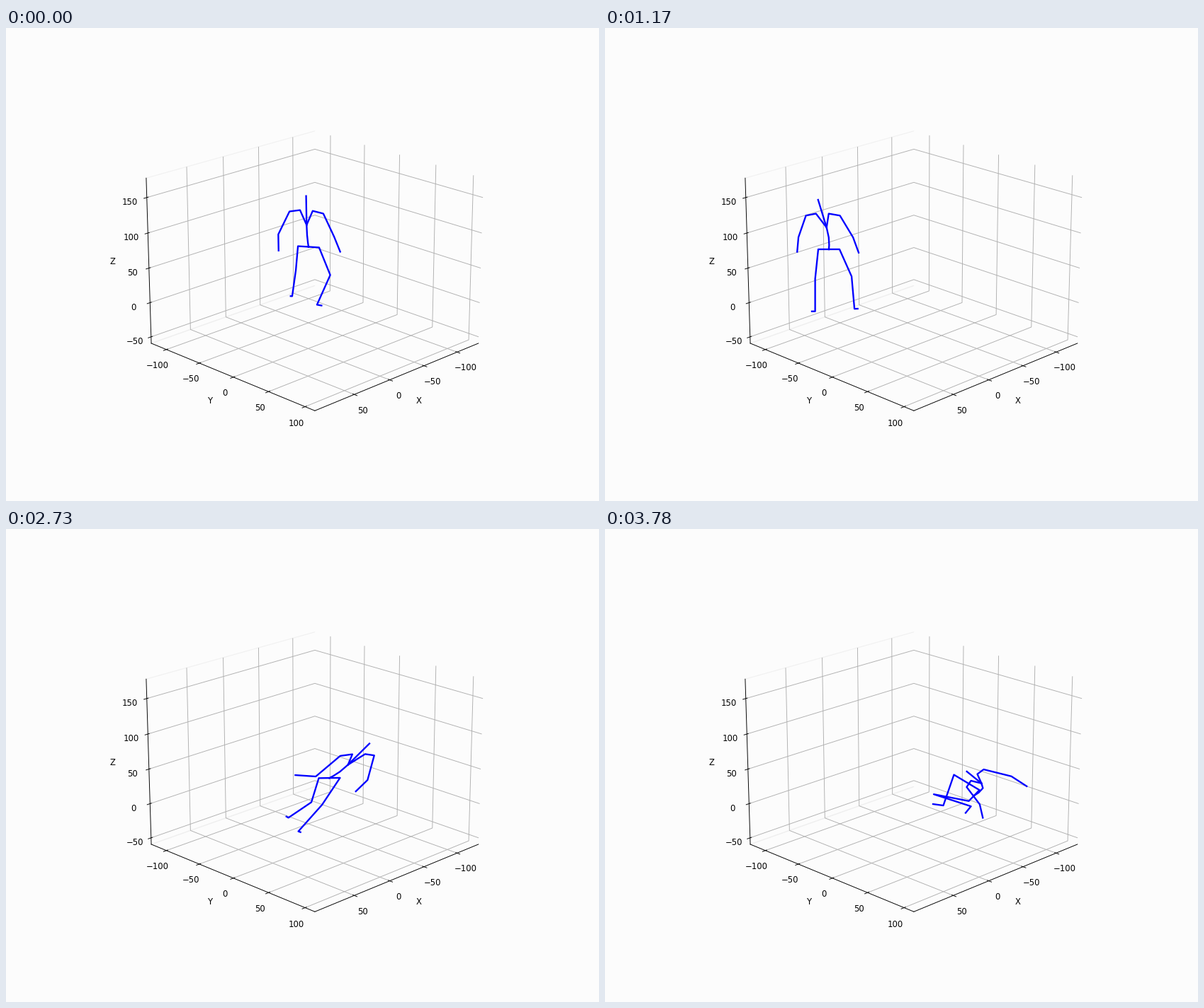
Recreate the animation shown at these times as a matplotlib script. Size 837 px wide and 669 px high, loop 3810 ms.

```python
import numpy as np
import matplotlib.pyplot as plt
from matplotlib.animation import FuncAnimation

W, H, DPI = 837, 669, 83.7
STEP, FRAMES = 30, 127
PAPER = "#fcfcfc"

# Bone lengths in pixels: torso and neck, upper arm and forearm, thigh and shin
SPINE, ARM, LEG = (31, 41), (36, 23), (42, 46)

times, poses = [], []


def pose(t, root, yaw, **limbs):
    """Add a key pose. A limb is two angles in degrees (0 points down,
    90 right) and, where it is foreshortened, a scale for its length."""
    names = ("spine", "arm_l", "arm_r", "leg_l", "leg_r")
    times.append(t)
    poses.append([*root, yaw, *(v for n in names for v in (*limbs[n], 1)[:3])])


# Walking away
pose(0, (427, 309.5), 6, spine=(185, 181),
     arm_l=(-26, 1), arm_r=(25, 22), leg_l=(-5, -8, 0.81), leg_r=(22, -24))
pose(690, (342, 310), 0, spine=(178, 174),
     arm_l=(-15, 91, 0.8), arm_r=(45, 49, 0.56),
     leg_l=(-13, -12, 0.89), leg_r=(30, 1, 0.85))
pose(1170, (316, 313), 0, spine=(186, 197),
     arm_l=(-19, -5, 0.9), arm_r=(31, 20), leg_l=(-6, 0), leg_r=(24, 5))
# Turning back and crouching
pose(1740, (333, 321.5), 40, spine=(185, 166),
     arm_l=(-31, 27), arm_r=(28, 59), leg_l=(45, -15), leg_r=(30, -51, 1.1))
pose(2280, (430.5, 348), 58, spine=(150, 108),
     arm_l=(-91, -73, 1.28), arm_r=(-48, -30, 1.12),
     leg_l=(75, -69, 0.75), leg_r=(72, -46, 1.09))
# Sitting down and leaning back
pose(3180, (469, 354.5), -65, spine=(117, 187),
     arm_l=(13, -70, 1.1), arm_r=(45, -21, 0.9),
     leg_l=(-115, -10, 1.05), leg_r=(-146, -35, 1.08))
pose(3780, (521, 377), -60, spine=(149, 231, 0.65),
     arm_l=(37, 13, 0.85), arm_r=(76, 57, 1.12),
     leg_l=(-101, 72, 1.2), leg_r=(-121, -19))

T, P = np.array(times, float), np.array(poses, float)
SPEED = np.gradient(P, T, axis=0)


def state_at(t):
    """Cubic Hermite blend between the two nearest key poses."""
    i = min(np.searchsorted(T, t, side="right") - 1, len(T) - 2)
    h = T[i + 1] - T[i]
    s = (t - T[i]) / h
    ease = s * s * (3 - 2 * s)
    return (P[i] * (1 - ease) + P[i + 1] * ease
            + h * s * (1 - s) * ((1 - s) * SPEED[i] - s * SPEED[i + 1]))


def aim(deg):
    return np.array([np.sin(np.radians(deg)), np.cos(np.radians(deg))])


def bones(start, lengths, first, second, reach):
    middle = start + reach * lengths[0] * aim(first)
    return middle, middle + reach * lengths[1] * aim(second)


def skeleton(state):
    root, yaw, (spine, *limbs) = state[:2], state[2], state[3:].reshape(5, 3)
    turn = aim(yaw)
    across = np.array([15, 9]) * turn[::-1]

    # The back is a curve that runs smoothly into the neck
    chest, head = bones(root, SPINE, *spine)
    neck = head - chest
    bend = chest - 0.4 * neck
    back = [(1 - s) ** 2 * root + 2 * s * (1 - s) * bend + s * s * chest
            for s in (0, 0.2, 0.55, 1)]
    lines = [[*back, chest + 0.65 * neck, head]]

    for side, arm, leg in zip((-1, 1), limbs[:2], limbs[2:]):
        collar = chest + 0.5 * neck + 0.6 * side * across
        shoulder = chest + 0.43 * neck + 1.6 * side * across
        lines.append([chest, collar, shoulder, *bones(shoulder, ARM, *arm)])

        hip = root + side * across
        knee, ankle = bones(hip, LEG, *leg)
        # Feet stand square to the shin, flattened towards the floor
        size = LEG[1] * (0.5 * turn[0] + 0.1 * side)
        toe = ankle + size * aim(leg[1] + 90) * (1, 0.4)
        lines.append([root, hip, knee, ankle, toe])
    return lines


# The small surplus guards the pixel size against rounding down
fig = plt.figure(figsize=((W + 0.01) / DPI, (H + 0.01) / DPI), dpi=DPI,
                 facecolor=PAPER)

room = fig.add_subplot(projection="3d", facecolor=PAPER)
room.view_init(elev=20, azim=45)
room.set_xticks(range(-100, 51, 50))
room.set_yticks(range(-100, 101, 50))
room.set_zticks(range(-50, 151, 50))
room.set(xlim=(-133.1, 103.5), ylim=(-123.5, 113.1), zlim=(-59.5, 177.1),
         xlabel="X", ylabel="Y", zlabel="Z")
for axis in (room.xaxis, room.yaxis, room.zaxis):
    axis.pane.fill = False
room.xaxis.pane.set_edgecolor("none")

# Overlay in pixel coordinates for the figure
stage = fig.add_axes([0, 0, 1, 1])
stage.set(xlim=(0, W), ylim=(H, 0))
stage.axis("off")
strokes = [stage.plot([], [], color="blue", lw=2)[0] for _ in range(5)]


def draw(n):
    for stroke, points in zip(strokes, skeleton(state_at(n * STEP))):
        stroke.set_data(*np.transpose(points))
    return strokes


anim = FuncAnimation(fig, draw, frames=FRAMES, interval=STEP,
                     repeat=True, repeat_delay=0, blit=False)
plt.show()
```
